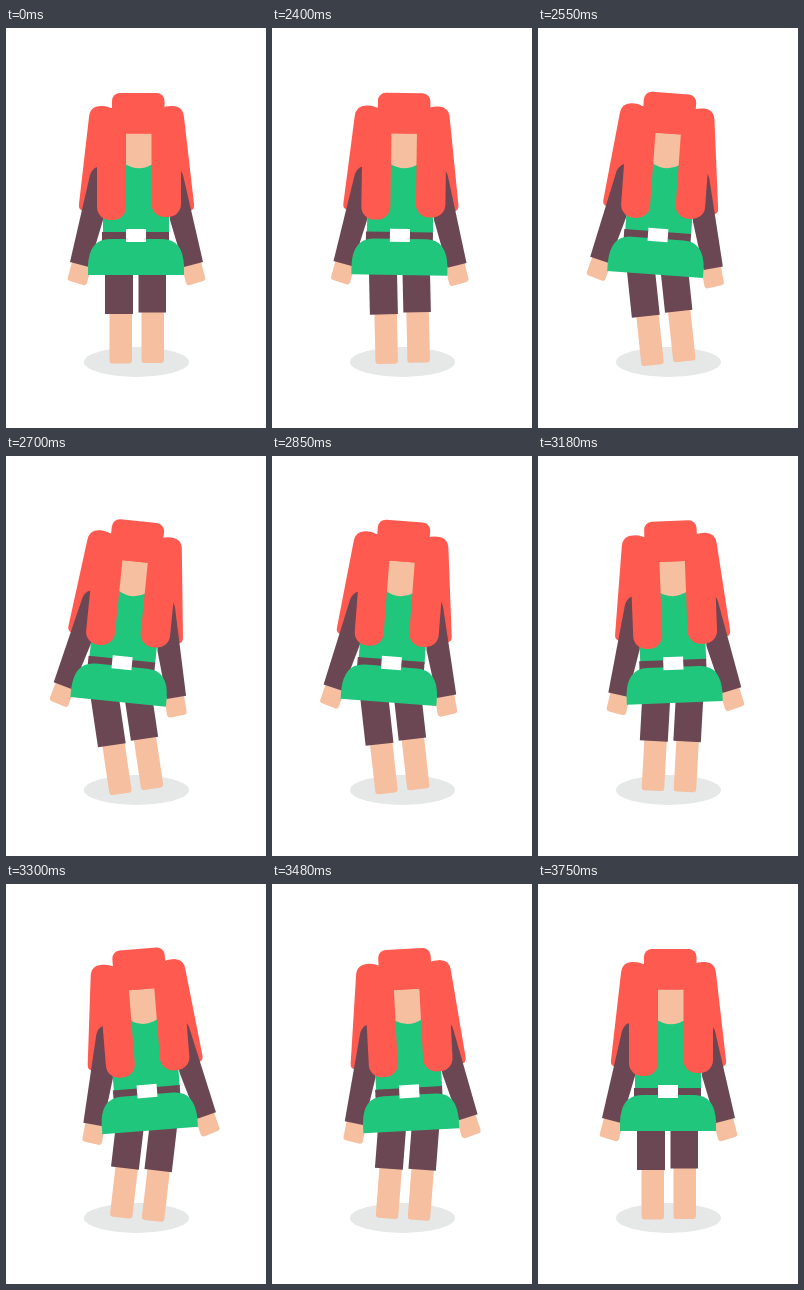
An HTML page that plays this animation: 260 by 400 pixels, repeating every 4.5 s.

```html
<!DOCTYPE html>
<html lang="en">
<head>
<meta charset="utf-8">
<title>Hip sway</title>
<style>
  html, body { margin: 0; width: 100%; height: 100%; overflow: hidden; background: #fff; }
  svg { display: block; width: 100vw; height: 100vh; }
  .hair { fill: #ff5a4f; }
  .cloth { fill: #6b4653; }
  .dress { fill: #21c67d; }
  .skin { fill: #f6bf9f; }
</style>
</head>
<body>
<svg viewBox="0 0 260 400">
  <defs>
    <g id="side">
      <path class="hair" d="M83 89Q84 78 95 78Q104 78 107 82V150L91 183H78Q72 182 73 176Z"/>
      <path class="skin" d="M66 234L85 239L81 255Q80 258 77 257L64 253Q61 252 62 249Z"/>
      <path class="cloth" d="M91 139L102 148L97 192L83 239L64 234L84 147Q86 141 91 139Z"/>
    </g>
  </defs>
  <ellipse cx="130.5" cy="334" rx="52.5" ry="15" fill="#e5e8e7"/>
  <g id="legs">
    <rect class="skin" x="103.5" y="270" width="22.5" height="65.5" rx="3"/>
    <rect class="skin" x="135.5" y="270" width="22.5" height="65" rx="3"/>
    <path class="cloth" d="M99 235H127V286H99ZM132.5 235H160V284.5H132.5Z"/>
  </g>
  <g id="body">
    <use href="#side"/>
    <use href="#side" transform="matrix(-1 0 0 1 261 0)"/>
    <path class="dress" d="M97 130H163V206H97Z"/>
    <path class="cloth" d="M96 204H163V213H96Z"/>
    <path class="dress" d="M82 247V238Q83 211 104 211H156Q177 211 178 238V247Z"/>
    <path d="M120 201H140V214H120Z" fill="#fff"/>
    <path class="skin" d="M119 100H147V136Q133 144.500 119 136Z"/>
    <g class="hair">
      <rect x="106" y="65" width="52.500" height="40.500" rx="8"/>
      <path d="M100 90H165V105.500H100Z"/>
      <rect x="91" y="80" width="29" height="112" rx="13"/>
      <rect x="145.500" y="80" width="29.500" height="109" rx="13"/>
    </g>
  </g>
</svg>
<script>
  const LOOP = 4500, STEP = 30, START = 2370, LEFT = 400, RIGHT = 1000, END = 1380;
  const body = document.getElementById('body');
  const legs = document.getElementById('legs');

  // Hip position: 1 is fully left, -1 fully right.
  function sway(t) {
    if (t <= 0 || t >= END) return 0;
    if (t < LEFT) return 1 - (1 - t / LEFT) ** 2;
    if (t < RIGHT) return 1 - 2 * (t - LEFT) / (RIGHT - LEFT);
    return -(((END - t) / (END - RIGHT)) ** 2);
  }

  function draw(now) {
    const t = Math.floor((now % LOOP) / STEP) * STEP;
    const s = sway(t - START);
    body.setAttribute('transform', `rotate(${6 * s} 131 70)`);
    legs.setAttribute('transform', `rotate(${-8.7 * s} 131 336)`);
    requestAnimationFrame(draw);
  }
  draw(0);
</script>
</body>
</html>
```
